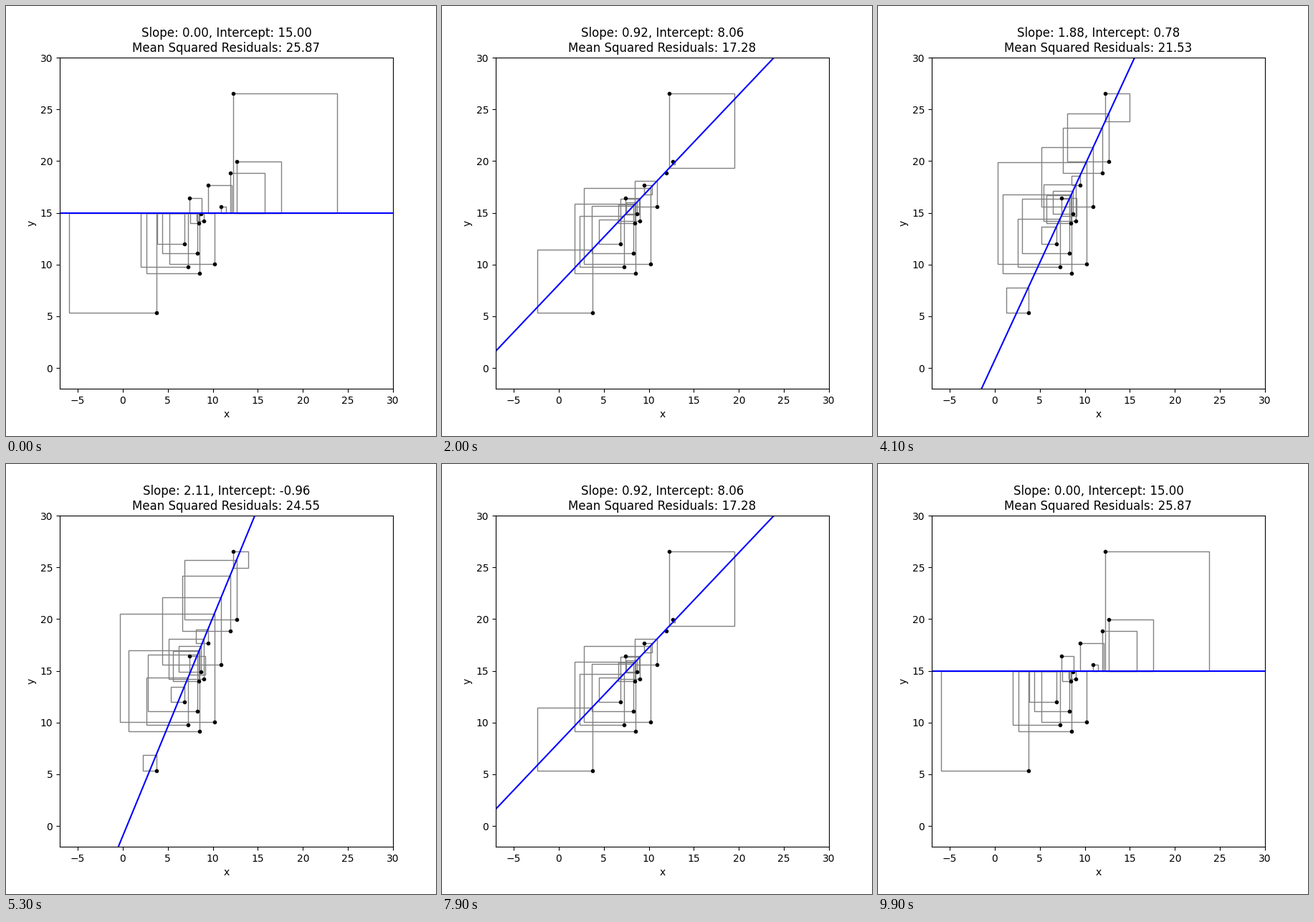
Write a matplotlib script that moves like this. It is 600 px wide and 600 px high and loops after 10 s.

```python
import numpy as np
import matplotlib.pyplot as plt
from matplotlib.animation import FuncAnimation
from matplotlib.patches import Rectangle

STEPS = 50
POINTS = 15
XLIM = (-7, 30)
YLIM = (-2, 30)

# Noisy samples around a straight trend.
np.random.seed(0)
px = 3 + 10 * np.sort(np.random.rand(POINTS))
py = 2 * px - 4 + 4 * np.random.randn(POINTS)

# The line tilts up over the first half and returns over the second.
slopes = np.linspace(0, 2.25, STEPS)
intercepts = np.linspace(15, -2, STEPS)

fig, ax = plt.subplots(figsize=(6, 6), dpi=100)
ax.set_xlim(*XLIM)
ax.set_ylim(*YLIM)
ax.set_xlabel("x")
ax.set_ylabel("y")
ax.plot(px, py, "k.")
line, = ax.plot([], [], color="blue")
squares = [
    ax.add_patch(Rectangle((0, 0), 0, 0, fill=False, edgecolor="gray"))
    for _ in range(POINTS)
]
title = ax.set_title("")


def update(frame):
    step = min(frame, 2 * STEPS - 1 - frame)
    slope, intercept = slopes[step], intercepts[step]
    fitted = slope * px + intercept
    residuals = py - fitted

    ends = np.array(XLIM)
    line.set_data(ends, slope * ends + intercept)
    for square, x, y, r in zip(squares, px, fitted, residuals):
        square.set_bounds(x, y, r, r)
    title.set_text(
        f"Slope: {slope:.2f}, Intercept: {intercept:.2f}\n"
        f"Mean Squared Residuals: {np.mean(residuals ** 2):.2f}"
    )
    return [line, title, *squares]


anim = FuncAnimation(fig, update, frames=2 * STEPS, interval=100,
                     repeat=True, repeat_delay=0)
plt.show()
```
